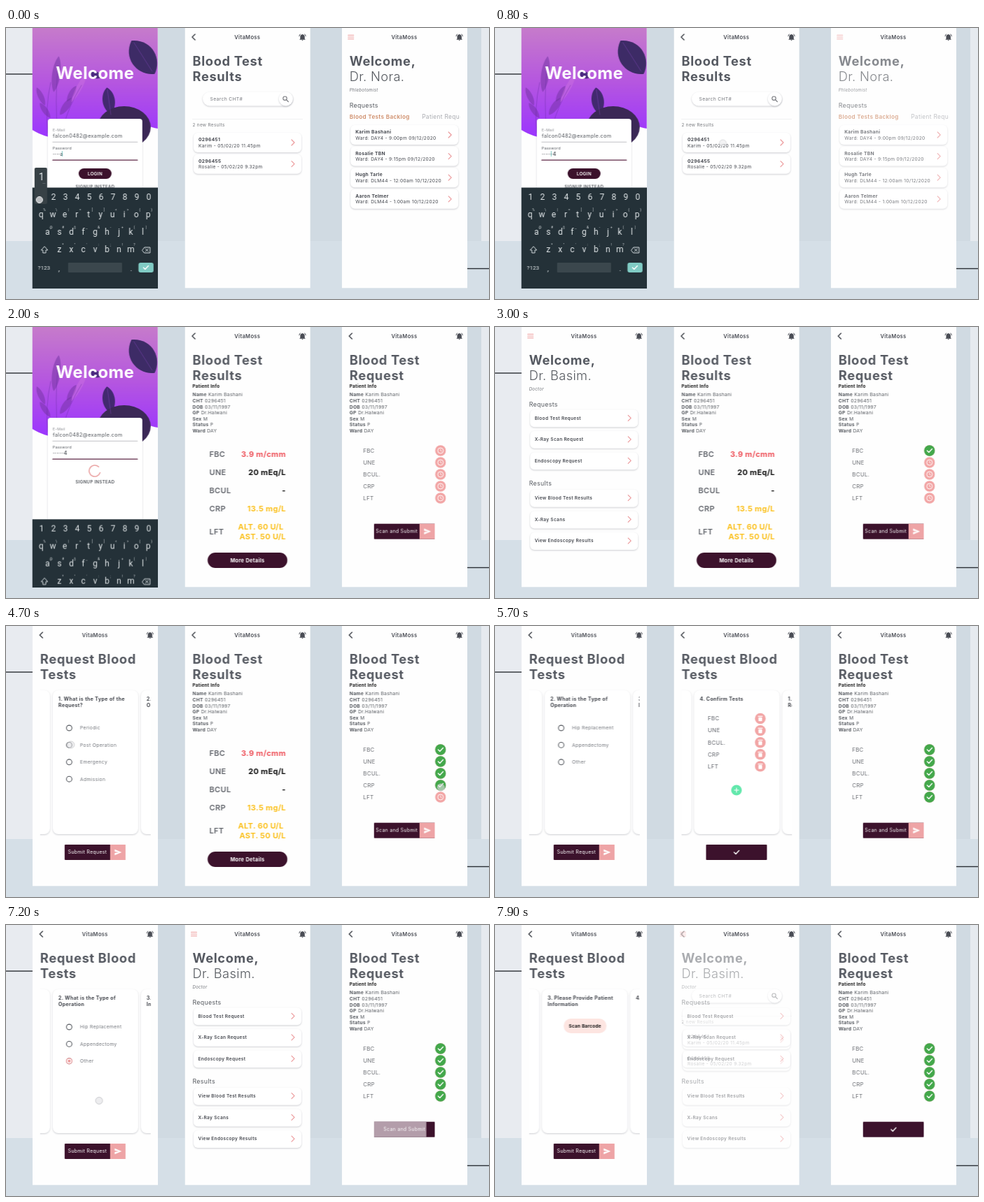
An HTML page for the animation above (8000 ms loop, 690 px wide and 388 px high).

```html
<!DOCTYPE html>
<html lang="en">
<head>
<meta charset="utf-8">
<title>Clinic app screens</title>
<style>
html, body { margin: 0; width: 100%; height: 100%; overflow: hidden; background: #d4dde5; }
#stage { display: block; width: 100vw; height: 100vh; fill: #55595f; font-family: Inter, "Open Sans", sans-serif; letter-spacing: .02em; }
.b { font-weight: 700; }
.m { font-weight: 600; }
.h { font-weight: 700; letter-spacing: .035em; fill: #555961; }
.l { font-weight: 300; letter-spacing: .02em; }
.i { font-style: italic; }
.c { text-anchor: middle; }
.r { text-anchor: end; }
.key { font-family: Roboto, sans-serif; letter-spacing: 0; text-anchor: middle; fill: #e3e8ea; }
.card { fill: #fff; filter: drop-shadow(0 1px .8px rgba(60, 65, 80, .25)); }
.line { fill: none; stroke-linecap: round; stroke-linejoin: round; }
</style>
</head>
<body>
<svg id="stage" viewBox="0 0 690 388"></svg>
<script>
const LOOP = 8000;
const DARK = '#3c122c', PINK = '#eea4a6', GREEN = '#43a84b', GREY = '#6c6f75';
let css = '', count = 0;

// Each track becomes one CSS keyframes rule; the class name is returned.
function track(prop, stops, ease = 'linear') {
  const name = 'k' + count++;
  const all = [...stops];
  if (all[0][0] > 0) all.unshift([0, all[0][1]]);
  if (all.at(-1)[0] < LOOP) all.push([LOOP, all.at(-1)[1]]);
  const body = all.map(([t, v]) => `${t / LOOP * 100}%{${prop}:${v}}`).join('');
  css += `@keyframes ${name}{${body}}.${name}{animation:${name} ${LOOP}ms ${ease} infinite}`;
  return name;
}
const fade = (...stops) => track('opacity', stops);
const span = (from, to = LOOP) =>
  track('opacity', [...(from ? [[0, 0]] : []), [from, 1], ...(to < LOOP ? [[to, 0]] : [])], 'step-end');
const move = (stops, ease) =>
  track('transform', stops.map(([t, x, y = 0]) => [t, `translate(${x}px,${y}px)`]), ease);

// Drawing helpers; text is placed by the middle of its capitals.
const g = (cls, body, at) => `<g class="${cls}"${at ? ` transform="translate(${at})"` : ''}>${body}</g>`;
const text = (x, y, s, size, cls = '', fill = '') =>
  `<text x="${x}" y="${(y + size * .36).toFixed(2)}" font-size="${size}" class="${cls}"${fill && ` fill="${fill}"`}>${s}</text>`;
const rect = (x, y, w, h, fill, r = 0, cls = '') =>
  `<rect x="${x}" y="${y}" width="${w}" height="${h}" rx="${r}" class="${cls}"${fill && ` fill="${fill}"`}/>`;
const disc = (x, y, r, fill, more = '') => `<circle cx="${x}" cy="${y}" r="${r}" fill="${fill}" ${more}/>`;
const line = (d, color, w = 1) => `<path d="${d}" class="line" stroke="${color}" stroke-width="${w}"/>`;
const frame = (x, y, w, h, body) => `<svg x="${x}" y="${y}" width="${w}" height="${h}">${body}</svg>`;

const chevron = (x, y) => line(`M${x - 2} ${y - 4}l4 4l-4 4`, '#ec9a9c', 1.2);
const tick = (x, y) => line(`M${x - 3.4} ${y}l2.4 2.5l4.6 -5`, '#fff', 1.4);
const back = line('M14.5 9l-4 4l4 4', '#43464d', 1.5);
const menu = line('M9 10.2h8M9 13h8M9 15.8h8', '#ee9c9c', 1.1);
const heading = (a, b) => text(11, 47.5, a, 18.3, 'h') + text(11, 69.5, b, 18.3, 'h');
const touch = (from, to, x, y) =>
  g(fade([0, 0], [from, 0], [from + 80, 1], [to, 1], [to + 120, 0]),
    disc(x, y, 5, 'rgba(225,225,228,.6)', 'stroke="#bfc0c4" stroke-width=".8"'));
const bar = `<g fill="#4a4d55">${text(89.3, 13, 'VitaMoss', 7.6, 'm c')}
  <path d="M164.8 15.5v-3q0 -3 3.2 -3.6q3.2 .6 3.2 3.6v3l1.2 1.2h-8.8zM167 17.2h2a1 1 0 0 1 -2 0z"/>
  ${line('M164.7 9l-1.4 2.6M171.3 9l1.4 2.6', '#4a4d55', 1)}</g>`;

// Sign-in screen
const leaf = (x, y, w, h, turn, fill, o = 1) =>
  `<path transform="translate(${x} ${y}) rotate(${turn})" opacity="${o}" fill="${fill}"
    d="M0 ${-h}C${w * 1.4} ${-h * .5} ${w * 1.2} ${h * .6} 0 ${h}C${-w * 1.2} ${h * .6} ${-w * 1.4} ${-h * .5} 0 ${-h}z"/>`;

function hero() {
  const fronds = [[12, 98, 4, 14, -25], [18, 118, 4, 13, -35], [34, 66, 6, 26, 8], [48, 112, 5, 15, 35], [56, 94, 4, 13, 30]];
  return '<path fill="url(#sky)" d="M0 0H179V144C168 142 160 138 150 136L60 150C40 162 20 158 0 146z"/>'
    + fronds.map(([x, y, w, h, a]) => leaf(x, y, w, h, a, '#71329f', .5)).join('')
    + leaf(67, 85, 4, 24, 28, '#d37be0', .35)
    + line('M22 150Q18 115 26 78M36 150Q32 105 36 60M45 140Q50 115 70 82', 'rgba(100,40,160,.5)', .8)
    + leaf(158, 42, 18, 29, -35, '#3d2b66')
    + leaf(109, 104, 9, 19, -8, '#42296f')
    + leaf(90, 67, 5, 9, -65, '#4b2a80')
    + '<ellipse cx="131" cy="142" rx="38" ry="30" fill="#3b2856"/>'
    + line('M145 21L171 62', 'rgba(150,80,210,.6)', .6) + line('M107 88L112 124', 'rgba(150,80,210,.6)', .6);
}

function password() {
  const state = (s, from, to) => g(span(from, to), text(29, 180, s, 7.2, 'm'));
  return state('····a', 0, 200) + state('·····1', 200, 600) + state('······4', 600)
    + g(span(0, 1000), line('M42.5 176.5v7', '#59b5b0', .8));
}

function keyboard() {
  const row = (keys, x, y, marks) => [...keys].map((k, n) =>
    text(x + 17 * n, y, k, 12, 'key') + (marks ? text(x + 17 * n + 5, y - 6.5, marks[n], 4.6, 'key', '#9eabb0') : '')).join('');
  const popup = (k, x, from, to) => g(span(from, to),
    rect(x - 10, 200, 18, 52, '#374146', 2) + text(x, 213, k, 14, 'key') + text(x + 3.5, 221, '...', 6, 'key'));
  return rect(0, 228.5, 180, 145, '#243138')
    + row('1234567890', 13, 242) + row('qwertyuiop', 12.3, 266.6, ['%', '\\', '|', '=', '[', ']', '&lt;', '&gt;', '{', '}'])
    + row('asdfghjkl', 21.6, 292, ['@', '#', '$', '_', '&amp;', '-', '+', '(', ')'])
    + row('zxcvbnm', 38.6, 317, '*"\':;!?')
    + line('M17 313l-4.5 5h2.4v4h4.2v-4h2.4z', '#d5dcdf', 1)
    + line('M157 318l3 -4h8v8h-8zM161.5 316l4 4M165.5 316l-4 4', '#d5dcdf', 1)
    + text(16.5, 343, '?123', 8, 'key', '#b9c4c8') + text(38, 344, ',', 10, 'key')
    + rect(51, 336, 77, 14, '#3b474d', 1) + text(141, 344, '.', 10, 'key')
    + rect(151.5, 336, 21.5, 14, '#80cbc4', 3) + tick(162, 343)
    + popup('1', 13, 0, 300) + popup('4', 64, 450, 700)
    + g(span(0, 250), disc(10, 246, 4.6, '#b9bcbf', 'stroke="#eceeef" stroke-width="1"'))
    + touch(480, 620, 63, 244) + touch(820, 950, 162, 343);
}

function login() {
  const turns = track('transform', [[0, 'rotate(0deg)'], [LOOP, 'rotate(2880deg)']]);
  const spinner = g('', g(turns, line('M5.5 -5.8A8 8 0 1 0 7.6 2.5', '#eba5a5', 1.6)), '89 206');
  return hero() + text(89.5, 64, 'Welcome', 24, 'b c', '#fff')
    + rect(22, 130, 135, 150, '', 4, 'card')
    + text(29, 146, 'E-Mail', 5.3, '', '#8b8d92') + text(29, 154, 'falcon0482@example.com', 7.3)
    + line('M29 163.3h121', '#a7a8ac', .7) + text(29, 172, 'Password', 5.3) + password()
    + line('M29 189.2h121', '#5d2746', 1.2)
    + g(span(0, 1000), rect(66, 201, 47, 15, DARK, 7.5) + text(89.5, 208.7, 'LOGIN', 6.3, 'm c', '#fff'))
    + g(span(1000), spinner)
    + g(move([[0, 0, 5.5], [1000, 0, 0]], 'step-end'), text(89.5, 221.5, 'SIGNUP INSTEAD', 6.1, 'm c'))
    + g(move([[1850, 0, 0], [2150, 0, 146]], 'ease-in'), keyboard());
}

// Home screens
const greeting = (name, role) => menu + text(11, 47.5, 'Welcome,', 18.3, 'h')
  + text(11, 69.5, name, 18.3, 'l') + text(11, 88.5, role, 6, 'i', GREY) + text(11, 110.5, 'Requests', 8.8);
const tile = (y, top, sub) => rect(12.5, y, 154, 28, '', 6, 'card')
  + text(19.5, y + 9.5, top, 6.7, 'b', '#44474e') + text(19.5, y + 18.2, sub, 6.6, '', '#44474e') + chevron(154.5, y + 14);

function doctorHome() {
  const entry = (s, y) => rect(12.5, y - 12, 154, 25, '', 6, 'card') + text(19, y, s, 6.5, 'm', '#44474e') + chevron(154.5, y);
  return greeting('Dr. Basim.', 'Doctor')
    + ['Blood Test Request', 'X-Ray Scan Request', 'Endoscopy Request'].map((s, n) => entry(s, 130.3 + 30.5 * n)).join('')
    + text(11, 224, 'Results', 8.8)
    + ['View Blood Test Results', 'X-Ray Scans', 'View Endoscopy Results'].map((s, n) => entry(s, 244.7 + 30.7 * n)).join('');
}

function labHome() {
  const backlog = [['Karim Bashani', 'DAY4 - 9:00pm 09/12/2020'], ['Rosalie TBN', 'DAY4 - 9:15pm 09/12/2020'],
    ['Hugh Tarle', 'DLM44 - 12:00am 10/12/2020'], ['Aaron Telmer', 'DLM44 - 1:00am 10/12/2020']];
  return greeting('Dr. Nora.', 'Phlebotomist')
    + text(11, 127, 'Blood Tests Backlog', 8.2, 'm', '#cf8e6b')
    + frame(110, 118, 58.5, 18, text(4.5, 9, 'Patient Requests', 8.4, '', '#a9abb0'))
    + backlog.map(([who, ward], n) => tile(139 + 30.6 * n, who, 'Ward: ' + ward)).join('');
}

// Results list and details
const resultList = () => rect(25.5, 91.5, 129, 20, '', 10, 'card') + disc(144.3, 101.5, 10, '#fff', 'class="card"')
  + text(36, 101.5, 'Search CHT#', 6.8, '', '#77797e')
  + disc(143, 100.7, 2.7, 'none', 'stroke="#77797e" stroke-width="1.1"') + line('M145.2 102.9l2.6 2.6', '#77797e', 1.2)
  + line('M11 130.5h157', '#e6e7ea', .6) + text(11, 139, '2 new Results', 6.4, '', '#77797e')
  + tile(150, '0296451', 'Karim - 05/02/20 11.45pm') + tile(180.7, '0296455', 'Rosalie - 05/02/20 9.32pm');

function patient() {
  const rows = [['Name', 'Karim Bashani'], ['CHT', '0296451'], ['DOB', '03/11/1997'], ['GP', 'Dr.Halwani'], ['Sex', 'M'], ['Status', 'P'], ['Ward', 'DAY']];
  return g(move([[1500, 0, -3.3], [1800, 0, 0]]), text(11, 84.5, 'Patient Info', 6.3, 'b', '#111')
    + rows.map(([k, v], n) => text(11, 97 + 8.6 * n, `<tspan class="b">${k}</tspan> ${v}`, 6.7)).join(''));
}

function details() {
  const labels = [['FBC', 181.7], ['UNE', 208], ['BCUL', 234.3], ['CRP', 260.5], ['LFT', 293]];
  const values = [['3.9 m/cmm', 181.7, '#ee545c'], ['20 mEq/L', 208, '#111'], ['-', 234.3, '#111'], ['13.5 mg/L', 260.5, '#fbc11f'],
    ['ALT. 60 U/L', 286.3, '#fbc11f', 141], ['AST. 50 U/L', 299.6, '#fbc11f']];
  const readings = labels.map(([s, y]) => text(35, y, s, 11, 'm', '#62656c')).join('')
    + values.map(([s, y, c, x = 144.3]) => text(x, y, s, 11, 'b r', c)).join('');
  return g(fade([1200, 0], [1650, 1]), heading('Blood Test', 'Results') + patient()
      + g(move([[1500, 0, -3], [1800, 0, 0]]), readings))
    + g(fade([1200, 0], [1450, 1]), rect(32.5, 323, 114, 22, DARK, 11) + text(89.5, 334, 'More Details', 7.4, 'b c', '#fff'));
}

// Two-part button; when pressed, the arrow leaves and a tick takes over.
function sendButton(y, label, press) {
  const words = text(32.5, 11, label, 6.9, 'c', '#fff');
  const arrow = rect(65, 0, 22, 22, PINK) + '<path fill="#fff" d="M71.5 6.8l10 4.2l-10 4.2v-3.3l6 -.9l-6 -.9z"/>';
  const body = press
    ? g(fade([press, 0], [press + 60, 1]), g(move([[press, 0], [press + 200, -12], [press + 450, -88]]), rect(0, 0, 87, 22, '#b39daa')))
      + g(fade([press + 200, 1], [press + 400, 0]), g(move([[press, 0], [press + 200, 11]]), words))
      + g(move([[press, 0], [press + 150, 23]]), arrow)
      + g(fade([press + 400, 0], [press + 500, 1]), tick(43.5, 11))
    : words + arrow;
  return frame(46, y, 87, 22, rect(0, 0, 87, 22, DARK, 1) + body);
}

const TESTS = ['FBC', 'UNE', 'BCUL.', 'CRP', 'LFT'];

function labRequest() {
  const doneAt = [2600, 3600, 4150, 4650, 5200];
  const rows = TESTS.map((s, n) => {
    const y = 177 + 17 * n;
    return text(30.5, y, s, 7.8, '', '#696c72') + disc(141, y, 7.7, '#f2a6a6')
      + disc(141, y, 4, 'none', 'stroke="#fff" stroke-width=".9"') + line(`M141 ${y - 2}v2l1.5 1`, '#fff', .8)
      + g(span(doneAt[n]), disc(141, y, 7.7, GREEN) + tick(141, y))
      + touch(doneAt[n] - 100, doneAt[n] + 80, 141.5, y + 3);
  }).join('');
  return heading('Blood Test', 'Request') + patient()
    + g(move([[1500, 0, -1], [1800, 0, 0]]), rows);
}

// Question cards
const STEP = 126;
const title = (a, b = '') => text(37, 104, a, 7.1, 'b', '#44474e') + text(37, 113.7, b, 7.1, 'b', '#44474e');

function options(list, picked, at) {
  return list.map((s, n) => {
    const y = 146 + 24.4 * n;
    const on = n === picked
      ? g(span(at), disc(52.5, y, 4, '#fff', 'stroke="#ec9a9c" stroke-width="1.2"') + disc(52.5, y, 2.1, '#ec9a9c')) : '';
    return disc(52.5, y, 3.9, 'none', 'stroke="#55595f" stroke-width="1.1"') + on + text(68, y, s, 6.8, '', '#75787e');
  }).join('');
}

function confirmTests() {
  const bin = (x, y) => disc(x, y, 7.7, '#f2a6a6') + rect(x - 2.6, y - 1.8, 5.2, 5.6, '#fff', .8) + rect(x - 3.3, y - 3.8, 6.6, 1.2, '#fff');
  return title('4. Confirm Tests')
    + TESTS.map((s, n) => text(48.5, 132.5 + 17.1 * n, s, 7.9, '', '#62656c') + bin(123.5, 132.5 + 17.1 * n)).join('')
    + disc(89.5, 235, 7.6, '#63e8ac') + line('M86.5 235h6M89.5 232v6', '#fff', 1.1);
}

function questions(slide, press) {
  const first = title('1. What is the Type of the', 'Request?') + options(['Periodic', 'Post Operation', 'Emergency', 'Admission'], 1, 4780);
  const second = title('2. What is the Type of', 'Operation') + options(['Hip Replacement', 'Appendectomy', 'Other'], 2, 6600);
  const third = title('3. Please Provide Patient', 'Information')
    + rect(60, 134, 61, 21, '#fde5e1', 10.5) + text(90.5, 145, 'Scan Barcode', 6.3, 'b c', '#111');
  const fourth = confirmTests();
  const cards = [fourth, first, second, third, fourth, first]
    .map((body, n) => g('', rect(29, 92, 122, 206, '', 8, 'card') + body, `${(n - 1) * STEP} 0`)).join('');
  return heading('Request Blood', 'Tests')
    + frame(11, 90, 157.5, 212, g('', g(slide, cards), '-11 -90'))
    + sendButton(313, 'Submit Request', press);
}

function swipe(from, x, y) {
  return g(move([[from + 80, 0], [from + 380, -70]], 'ease-out'), touch(from, from + 280, x, y));
}

// The three phones
const EASE = 'cubic-bezier(.33,1,.68,1)';
const slides = move([[5200, 0], [5935, -STEP], [7312, -STEP], [8000, -2 * STEP]], EASE);

const phoneA = g(fade([2100, 1], [2400, 0]), login())
  + g(fade([0, 0], [2150, 0], [2500, 1], [3450, 1], [3750, 0]), bar + doctorHome())
  + g(fade([0, 0], [3500, 0], [3850, 1]), bar + back + questions(slides))
  + touch(3300, 3450, 60, 131) + touch(4630, 4800, 55, 170) + swipe(5130, 120, 250)
  + touch(6480, 6650, 54, 195) + swipe(7110, 99.5, 251.5);

const phoneB = bar
  + g(fade([6450, 1], [6700, 0], [7800, 0], [8000, 1]), back)
  + g(fade([800, 1], [1150, 0], [7800, 0], [8000, 1]), resultList())
  + g(fade([800, 1], [1150, 0]), heading('Blood Test', 'Results'))
  + g(fade([4880, 1], [5040, 0]), details())
  + g(fade([0, 0], [4930, 0], [5100, 1], [6400, 1], [6700, 0]), questions(move([[0, -3 * STEP]]), 5150))
  + g(fade([0, 0], [6450, 0], [6800, 1], [7800, 1], [8000, 0]), doctorHome())
  + touch(600, 760, 70, 165) + touch(7560, 7720, 65, 243);

const phoneC = bar
  + g(fade([700, 1], [1050, 0]), labHome())
  + g(fade([0, 0], [1050, 0], [1530, 1]), labRequest())
  + g(fade([0, 0], [1050, 0], [1400, 1]), back + sendButton(281.7, 'Scan and Submit', 7000))
  + touch(500, 660, 70, 154) + touch(6860, 7000, 80, 294);

const phone = (x, body) => frame(x, 0, 179.3, 372.5, rect(0, 0, 179.3, 372.5, '#fefefe') + body);
document.getElementById('stage').innerHTML =
  `<defs><linearGradient id="sky" x1="0" y1="0" x2="0" y2="1">
    <stop offset="0" stop-color="#c67bcb"/><stop offset=".5" stop-color="#b556e0"/><stop offset="1" stop-color="#9b35ff"/>
  </linearGradient></defs>`
  + rect(0, 0, 690, 388, '#d0dae2') + rect(0, 305, 690, 83, '#d5dfe7')
  + rect(0, 0, 38, 305, '#e8ebf0') + rect(679, 0, 11, 305, '#e6eaef')
  + rect(0, 65.3, 38, 1.4, '#2b2f36') + rect(659, 343.8, 31, 1.4, '#2b2f36')
  + phone(37.7, phoneA) + phone(255.5, phoneB) + phone(479.7, phoneC);

const sheet = document.createElement('style');
sheet.textContent = css;
document.head.append(sheet);
</script>
</body>
</html>
```
